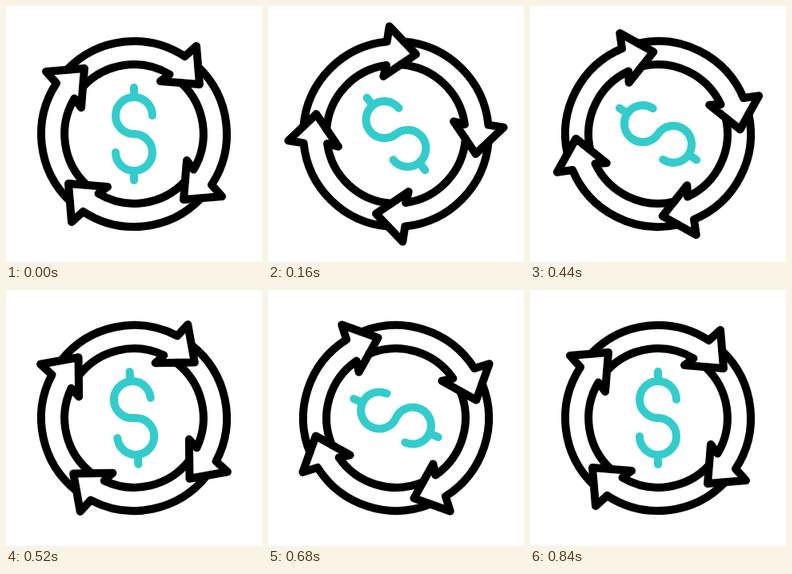
An HTML page for the animation above (1.24 s loop, 320 by 320 pixels).

```html
<!DOCTYPE html>
<html lang="en">
<head>
<meta charset="utf-8">
<title>Money cycle</title>
<style>
  html, body { margin: 0; width: 100%; height: 100%; overflow: hidden; background: #fff; }
  svg { display: block; width: 100%; height: 100%; }
</style>
</head>
<body>
<svg viewBox="-160 -160 320 320">
  <g id="icon" fill="none" stroke="#000" stroke-width="10" stroke-linecap="round" stroke-linejoin="round">
    <path id="arrow" d="M-80.2 83.8A116 116 0 0 1 -97 -63.6L-110 -78L-62 -82L-66 -33L-74.5 -44.5A87 87 0 0 0 -59 63.9"/>
    <use href="#arrow" transform="rotate(90)"/>
    <use href="#arrow" transform="rotate(180)"/>
    <use href="#arrow" transform="rotate(270)"/>
    <path stroke="#33cccc" d="M23 -23A23 23 0 1 0 0 0A23 23 0 1 1 -23 23M0 -58V-46M0 46V58"/>
  </g>
</svg>
<script>
const LOOP = 1240, STEP = 20;
const TURN = 340, END = 840;   // wind-up ends, spin ends (ms)
const BACK = -85, FULL = 180;  // degrees
const icon = document.getElementById('icon');

// cubic-bezier(h, 0, 1 - h, 1), solved by bisection
function ease(x, h = 0.315) {
  let lo = 0, hi = 1;
  for (let i = 0; i < 24; i++) {
    const s = (lo + hi) / 2, r = 1 - s;
    if (3 * h * s * r * r + 3 * (1 - h) * s * s * r + s * s * s < x) lo = s;
    else hi = s;
  }
  return lo * lo * (3 - 2 * lo);
}

function angle(t) {
  if (t >= END) return FULL;
  if (t < TURN) return BACK * ease(t / TURN);
  return BACK + (FULL - BACK) * ease((t - TURN) / (END - TURN));
}

let start;
function draw(now) {
  start ??= now;
  const t = Math.floor((now - start) % LOOP / STEP) * STEP;
  icon.setAttribute('transform', `rotate(${angle(t).toFixed(3)})`);
  requestAnimationFrame(draw);
}
requestAnimationFrame(draw);
</script>
</body>
</html>
```
